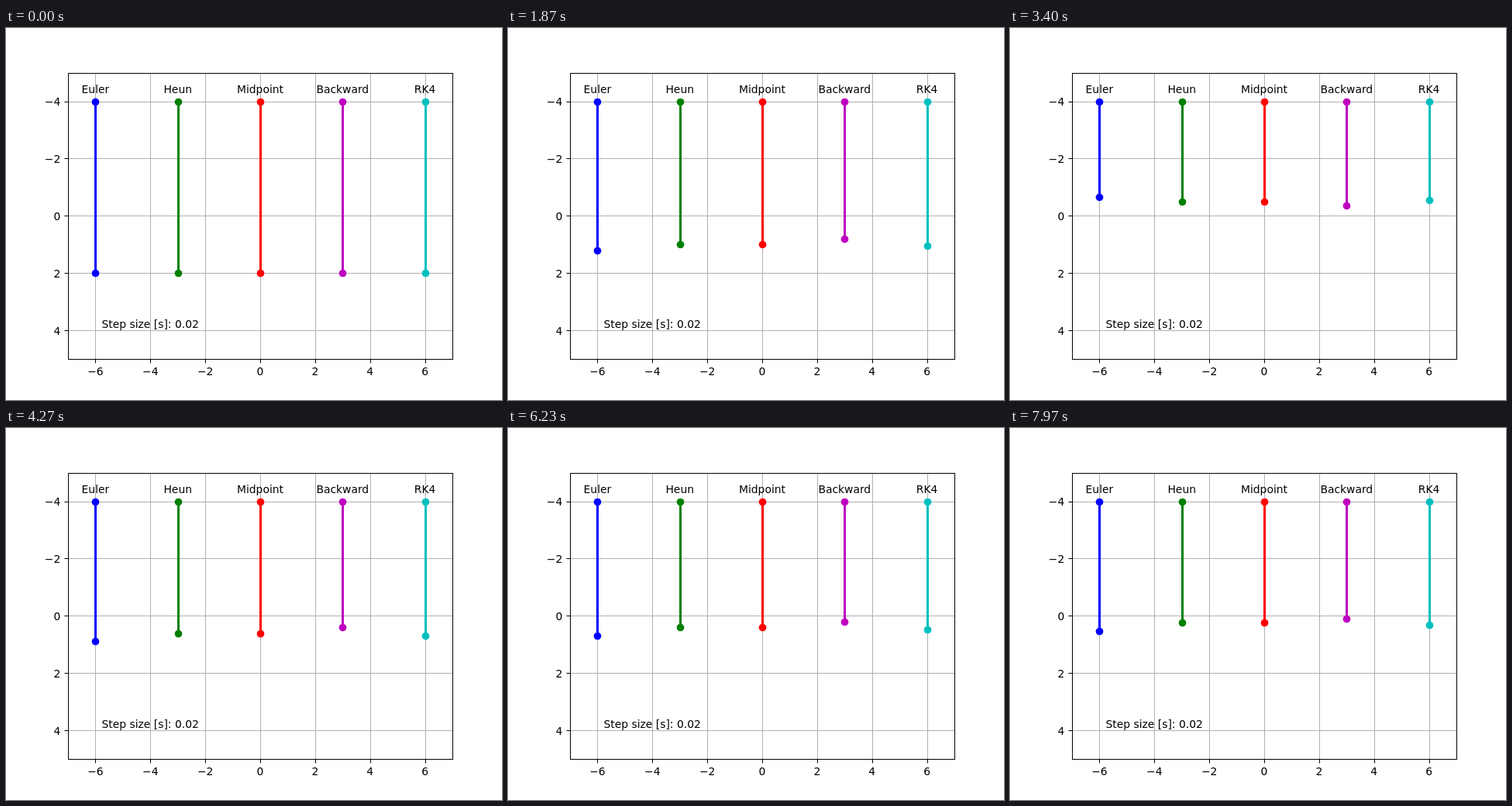
Animation, 640 px wide and 480 px high, one loop 8000 ms. Source, as an HTML page:

```html
<!DOCTYPE html>
<html lang="en">
<head>
<meta charset="utf-8">
<title>Damped oscillator: integration methods</title>
<style>
  html, body { margin: 0; width: 100%; height: 100%; overflow: hidden; background: #fff; }
  svg { display: block; width: 640px; height: 480px; }
  text { font: 13.889px "DejaVu Sans", sans-serif; }
</style>
</head>
<body>
<svg id="stage" viewBox="0 0 640 480"></svg>
<script>
const LOOP = 8000, FPS = 30, STEP = 0.02;
const DECAY = 0.255, OMEGA = 3.122, START = 2, SPEED = 1, ANCHOR = -4;

// Each method multiplies the state by 1 + z + c z², where z = lambda * STEP.
const methods = [
  { name: 'Euler', x: -6, color: '#0000ff', c: 0 },
  { name: 'Heun', x: -3, color: '#008000', c: 1 / 2 },
  { name: 'Midpoint', x: 0, color: '#ff0000', c: 1 / 2 },
  { name: 'Backward', x: 3, color: '#bf00bf', c: 1 },
  { name: 'RK4', x: 6, color: '#00bfbf', c: 1 / 3 }
];

const stage = document.getElementById('stage');
const toX = x => 328 + x * 496 / 14;
const toY = y => 242.4 + y * 36.96;
const snap = v => Math.round(v) + 0.5;

function add(tag, attrs, text = '') {
  const el = document.createElementNS('http://www.w3.org/2000/svg', tag);
  for (const key in attrs) el.setAttribute(key, attrs[key]);
  el.textContent = text;
  return stage.appendChild(el);
}
const line = (x1, y1, x2, y2, stroke, width = 1) =>
  add('line', { x1, y1, x2, y2, stroke, 'stroke-width': width });
const label = (x, y, text, anchor = 'middle') =>
  add('text', { x, y, 'text-anchor': anchor }, text);
const number = n => String(n).replace('-', '\u2212');

const left = 80.5, right = 576.5, top_ = 58.5, bottom = 427.5;

for (let v = -6; v <= 6; v += 2) {
  const x = snap(toX(v));
  line(x, top_, x, bottom, '#b0b0b0');
  line(x, bottom, x, bottom + 5, '#000');
  label(toX(v), 448, number(v));
}
for (let v = -4; v <= 4; v += 2) {
  const y = snap(toY(v));
  line(left, y, right, y, '#b0b0b0');
  line(left - 5, y, left, y, '#000');
  label(70.3, Math.round(toY(v) + 5.3), number(v), 'end');
}

for (const m of methods) {
  const cx = snap(toX(m.x)), cy = snap(toY(ANCHOR));
  const dot = { cx, cy, r: 4.86, fill: m.color };
  m.rod = line(cx, cy, cx, cy, m.color, 3);
  add('circle', dot);
  m.mass = add('circle', dot);
  label(toX(m.x), 84, m.name);

  const re = -DECAY * STEP, im = OMEGA * STEP;
  const zr = 1 + re + m.c * (re * re - im * im);
  const zi = im + 2 * m.c * re * im;
  m.rate = Math.log(Math.hypot(zr, zi)) / STEP;
  m.freq = Math.atan2(zi, zr) / STEP;
}
add('rect', { x: left, y: top_, width: right - left, height: bottom - top_, fill: 'none', stroke: '#000' });
label(123.5, 387, 'Step size [s]: 0.02', 'start');

const sinPart = (SPEED + DECAY * START) / OMEGA;

function draw(ms) {
  const frame = Math.min(LOOP * FPS / 1000 - 1, Math.floor((ms + 3.4) * FPS / 1000));
  const t = frame / FPS;
  for (const m of methods) {
    const angle = m.freq * t;
    const pos = Math.exp(m.rate * t) * (START * Math.cos(angle) + sinPart * Math.sin(angle));
    const y = snap(toY(pos));
    m.rod.setAttribute('y2', y);
    m.mass.setAttribute('cy', y);
  }
}

const begin = performance.now();
function tick() {
  draw((performance.now() - begin) % LOOP);
  requestAnimationFrame(tick);
}
tick();
</script>
</body>
</html>
```
